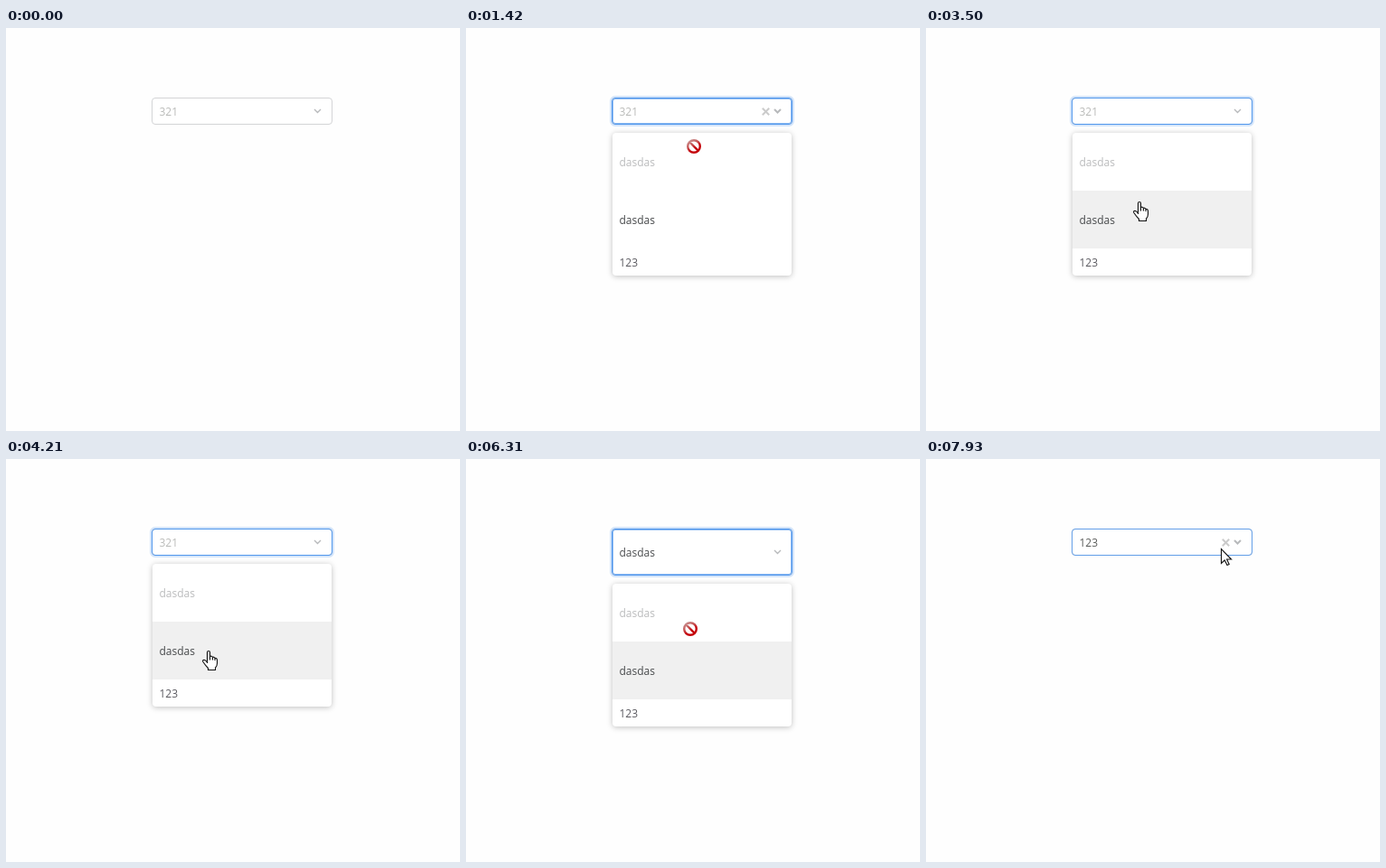
Write an HTML page with a canvas that moves like this. It is 502 by 446 pixels and loops after 8 s.

```html
<!DOCTYPE html>
<html lang="en">
<head>
<meta charset="utf-8">
<title>Select with options</title>
<style>
  html, body { margin: 0; width: 502px; height: 446px; overflow: hidden; background: #fefefe; }
  canvas { display: block; }
</style>
</head>
<body>
<canvas id="stage" width="502" height="446"></canvas>
<script>
const ctx = document.getElementById('stage').getContext('2d');
const LOOP = 8000;
const BLUE = '#4f96ec';
const BOX = { x: 161, y: 77, w: 200 };
const PICK_FIRST = 4560, PICK_SECOND = 7060;

// Pointer moves: start, end, x, y
const MOVES = [
  [0, 0, 358, 320],
  [170, 640, 248, 98],
  [1230, 1420, 252, 131],
  [1460, 1650, 245, 141],
  [1760, 2030, 230, 231],
  [2150, 2260, 234, 223],
  [2390, 2570, 230, 256],
  [3010, 3120, 231, 229],
  [3310, 3660, 237, 162],
  [3920, 4210, 222, 212],
  [4760, 5370, 303, 120],
  [5400, 5670, 288, 107],
  [5980, 6610, 212, 261],
  [6650, 6770, 207, 270],
  [7030, 7100, 206, 270],
  [7260, 7930, 326, 99],
];

const ARROW = new Path2D('M.5 .5V16.5L4.2 13L7 18.6L9.2 17.6L6.6 12H11.6Z');
const HAND = new Path2D('M5.5 14V2Q5.5 .5 7 .5T8.5 2V6.5Q10.5 5.5 11.3 7.3Q13 6.6 14 8.4' +
  'Q16.5 8 16.5 11V14Q16.5 17 14.5 19V21.5H6.5V19.5Q4 17 .7 12.2Q.2 10.5 2 10.3Q3.5 10.5 5.5 13Z');
const KNUCKLES = new Path2D('M8.5 6.5V10.5M11.4 7.5V10.5M14 8.5V11');

const clamp = v => Math.max(0, Math.min(1, v));
const pulse = (t, on, off, fade) => Math.min(clamp((t - on) / fade), clamp(1 - (t - off) / fade));

function pointerAt(t) {
  let [, , x, y] = MOVES[0];
  for (const [start, end, toX, toY] of MOVES.slice(1)) {
    const p = clamp((t - start) / (end - start));
    x += (toX - x) * p;
    y += (toY - y) * p;
  }
  return { x: Math.round(x), y: Math.round(y) };
}

function text(string, y, color) {
  ctx.fillStyle = color;
  ctx.fillText(string, 169.5, y);
}

function line(points, color, width) {
  ctx.strokeStyle = color;
  ctx.lineWidth = width;
  ctx.beginPath();
  points.forEach(([x, y]) => ctx.lineTo(x, y));
  ctx.stroke();
}

// Outline whose centre line lies `inset` px inside the select box
function outline(h, inset, width, color, alpha) {
  ctx.globalAlpha = alpha;
  ctx.strokeStyle = color;
  ctx.lineWidth = width;
  ctx.beginPath();
  ctx.roundRect(BOX.x + inset, BOX.y + inset, BOX.w - 2 * inset, h - 2 * inset, 4 - inset);
  ctx.stroke();
  ctx.globalAlpha = 1;
}

function drawSelect(t) {
  const tall = t >= PICK_FIRST && t < PICK_SECOND;
  const h = tall ? 52 : 30;
  const mid = BOX.y + h / 2;
  const focus = Math.max(pulse(t, 720, 4640, 300), pulse(t, 5790, 7130, 300));
  const hover = Math.max(pulse(t, 560, 1440, 180), pulse(t, 5170, 6060, 180), pulse(t, 7780, 9000, 140));
  const thick = t < 3350 || t > 5700;

  ctx.fillStyle = '#fff';
  ctx.fillRect(BOX.x + 1, BOX.y + 1, BOX.w - 2, h - 2);
  outline(h, 0.5, 1, '#d3d4d6', 1);
  outline(h, 0.5, 1, BLUE, Math.max(focus, hover * 0.85));
  outline(h, -1, 2, BLUE, focus * 0.24);
  if (thick) outline(h, 1.5, 1, BLUE, focus * 0.65);

  if (t < PICK_FIRST) text('321', 97, '#b9bab8');
  else if (tall) text('dasdas', 108, '#4c4e50');
  else text('123', 97, '#5a5c5a');

  const cy = Math.floor(mid) + 0.5;
  line([[341, cy - 2.5], [344.5, cy + 1], [348, cy - 2.5]], '#b8babc', 1.4 + 0.6 * hover);
  ctx.globalAlpha = hover;
  line([[327.8, cy - 3.7], [335.2, cy + 3.7]], '#cbcbcb', 2);
  line([[335.2, cy - 3.7], [327.8, cy + 3.7]], '#cbcbcb', 2);
  ctx.globalAlpha = 1;
}

function drawMenu(t, top) {
  const open = Math.max(pulse(t, 700, PICK_FIRST, 160), pulse(t, 5790, PICK_SECOND, 160));
  if (!open) return;
  ctx.save();
  ctx.globalAlpha = open;
  ctx.translate(0, top);
  ctx.scale(1, 0.8 + 0.2 * open);

  ctx.save();
  ctx.shadowColor = 'rgba(0,0,0,.25)';
  ctx.shadowBlur = 6;
  ctx.shadowOffsetY = 1;
  ctx.fillStyle = '#fff';
  ctx.beginPath();
  ctx.roundRect(162, 0, 198, 158, 4);
  ctx.fill();
  ctx.restore();

  ctx.clip();
  if (t > 1900) {
    ctx.fillStyle = t < 3350 ? '#f7f7f7' : '#f0f0f0';
    ctx.fillRect(162, 64, 198, 64);
  }
  if ((t > 2500 && t < 3350) || t > 6730) {
    ctx.fillStyle = '#f7f7f7';
    ctx.fillRect(162, 128, 198, 30);
  }
  text('dasdas', 37, '#bbbcbd');
  text('dasdas', 101, '#484a4c');
  text('123', 148, '#5b5a60');
  ctx.restore();
}

function drawForbidden() {
  const shade = ctx.createLinearGradient(-6, -8, 3, 6);
  shade.addColorStop(0, '#c9a3a3');
  shade.addColorStop(0.45, '#c65555');
  shade.addColorStop(0.75, '#c40008');
  ctx.strokeStyle = shade;
  ctx.lineWidth = 2.4;
  ctx.beginPath();
  ctx.arc(0, 0, 6.8, 0, Math.PI * 2);
  ctx.moveTo(-4.8, -4.8);
  ctx.lineTo(4.8, 4.8);
  ctx.stroke();
}

function drawPointer(t, top) {
  if (t < 170) return;
  const { x, y } = pointerAt(t);
  const open = (t > 700 && t < PICK_FIRST) || (t > 5790 && t < PICK_SECOND);
  const row = y - top;
  ctx.save();
  ctx.translate(x, y);
  ctx.fillStyle = '#fff';
  ctx.strokeStyle = '#111';
  ctx.lineWidth = 1.1;
  if (open && row >= 0 && row < 64) {
    drawForbidden();
  } else {
    const overOption = open && row >= 64 && row < 158;
    if (overOption) ctx.translate(-5, 0);
    const shape = overOption ? HAND : ARROW;
    ctx.fill(shape);
    ctx.stroke(shape);
    if (overOption) ctx.stroke(KNUCKLES);
  }
  ctx.restore();
}

function draw(now) {
  const t = now % LOOP;
  const menuTop = t < 5400 ? 116 : 138;
  ctx.fillStyle = '#fefefe';
  ctx.fillRect(0, 0, 502, 446);
  ctx.font = '12px "Open Sans", "Noto Sans", sans-serif';
  drawSelect(t);
  drawMenu(t, menuTop);
  drawPointer(t, menuTop);
}

const begin = performance.now();
function tick() {
  draw(performance.now() - begin);
  requestAnimationFrame(tick);
}
tick();
</script>
</body>
</html>
```
